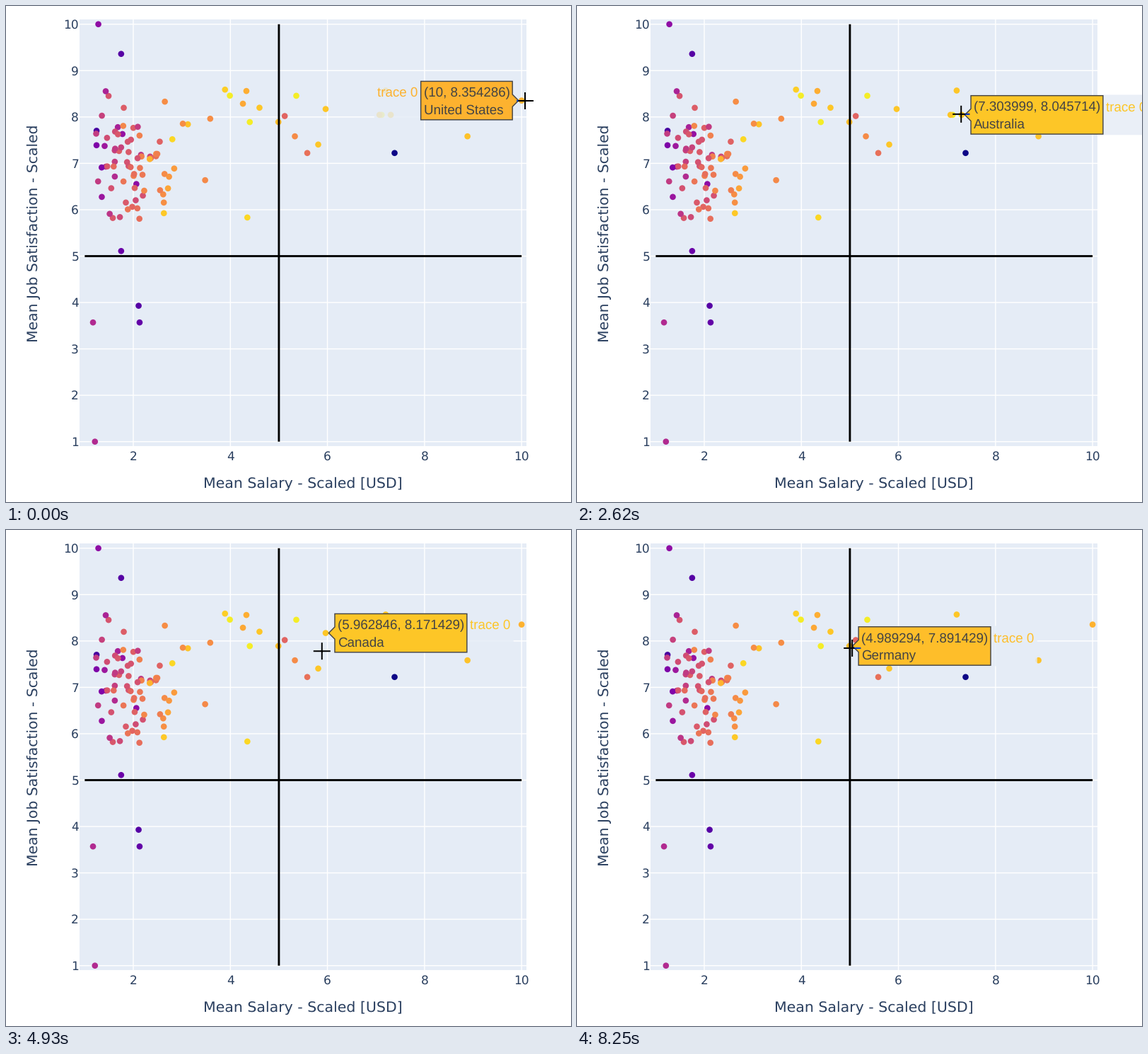
Animation of 799 by 701 pixels, one loop 9.29 s. Source, as a matplotlib script:

```python
import math

import numpy as np
import matplotlib.pyplot as plt
from matplotlib.animation import FuncAnimation
from matplotlib.patches import Polygon, Rectangle

W, H, DPI = 799, 701, 100
LOOP, FRAMES = 9290, 310
STEP = 70            # ms between two pointer jumps
REACH = 29           # hover radius in pixels
ZOOM = 1.44          # page zoom of the chart
INK, PLOT_BG = "#2a3f5f", "#e5ecf6"
plasma = plt.get_cmap("plasma")

plt.rcParams.update({"text.hinting": "none", "path.snap": False})


def px(n):
    return n * 72 / DPI


def sx(v):
    return 180 + (v - 2) * 68.64


def sy(v):
    return 615.7 - (v - 1) * 65.55


fig = plt.figure(figsize=(W / DPI, H / DPI), dpi=DPI, facecolor="white")
ax = fig.add_axes([0, 0, 1, 1])
ax.set(xlim=(0, W), ylim=(H, 0))
ax.axis("off")


def label(x, y, s, size=17, color=INK, font="DejaVu Sans", **kw):
    kw = {"ha": "center", "va": "baseline", **kw}
    return ax.text(x, y, s, fontsize=px(size), color=color, family=font, **kw)


def line(xs, ys, width, color, z):
    return ax.plot(xs, ys, color=color, lw=px(width), zorder=z,
                   solid_capstyle="butt")[0]


# Plot area, grid, centre lines and axis text
ax.add_patch(Rectangle((104, 19), 632, 603, fc=PLOT_BG, ec="none", zorder=0))
for v in range(1, 11):
    line([104, 736], [sy(v)] * 2, ZOOM, "white", 1)
    label(103, sy(v) + 6.2, str(v), ha="right")
    if v % 2 == 0:
        line([sx(v)] * 2, [19, 622], ZOOM, "white", 1)
        label(sx(v), 642, str(v))
line([sx(5)] * 2, [sy(10), sy(1)], 2 * ZOOM, "black", 3)
line([sx(1), sx(10)], [sy(5)] * 2, 2 * ZOOM, "black", 3)
label(420, 681, "Mean Salary - Scaled [USD]", 20.5)
label(45.5, 321, "Mean Job Satisfaction - Scaled", 20.4,
      rotation=90, rotation_mode="anchor")

# Hovered countries: salary, satisfaction, colour score
COUNTRIES = {
    "United States": (10, 8.354286, 0.83),
    "Ireland": (8.885159, 7.582857, 0.87),
    "Bermuda": (7.383412, 7.222857, 0),
    "Australia": (7.303999, 8.045714, 0.88),
    "Denmark": (7.117238, 8.045714, 0.97),
    "United Kingdom": (7.072585, 8.045714, 0.88),
    "Canada": (5.962846, 8.171429, 0.88),
    "New Zealand": (5.810127, 7.405714, 0.88),
    "Japan": (5.584766, 7.222857, 0.64),
    "Israel": (5.329384, 7.582857, 0.72),
    "Norway": (5.358215, 8.457143, 0.97),
    "Paraguay": (5.120127, 8.02, 0.6),
    "Germany": (4.989294, 7.891429, 0.86),
}

# Points standing apart from the cloud
OUTLIERS = [(7.2, 8.57, 0.88), (4.6, 8.2, 0.88), (4.33, 8.56, 0.82),
            (3.99, 8.46, 0.97), (3.89, 8.59, 0.9), (4.4, 7.89, 0.97),
            (1.28, 10, 0.3), (1.75, 9.36, 0.15), (1.75, 5.11, 0.2),
            (2.11, 3.93, 0.15), (2.13, 3.57, 0.18), (1.17, 3.57, 0.4),
            (1.21, 1, 0.4)]


def cloud(n=80):
    """Dense group on the left; higher salaries get warmer colours."""
    rng = np.random.default_rng(7)
    x = np.clip(1.1 + rng.gamma(2.3, 0.5, n), 1, 4.35)
    y = np.clip(rng.normal(6.85 + 0.13 * x, 0.75), 5.5, 8.75)
    score = 0.92 - 0.75 * np.exp(0.85 * (1 - x)) + rng.normal(0, 0.1, n)
    return np.column_stack([x, y, np.clip(score, 0.12, 0.92)])


points = np.vstack([cloud(), OUTLIERS, list(COUNTRIES.values())])
ax.scatter(sx(points[:, 0]), sy(points[:, 1]), s=px(6 * ZOOM) ** 2,
           c=plasma(points[:, 2]), lw=0, zorder=2)


class Tip:
    """Hover label with a pointer, beside its data point."""

    def __init__(self, country, salary, satisfaction, score):
        self.x, self.y = x, y = sx(salary), sy(satisfaction)
        color = plasma(score)
        edge = "#444444" if score > 0.3 else "white"
        pad, half, arrow = 3 * ZOOM, 27.2, 6 * ZOOM

        def text(dy, s, c, **kw):
            return label(0, y + dy, s, 13 * ZOOM, c, "Liberation Sans",
                         zorder=6, **{"ha": "left", **kw})

        value = f"({salary:.7g}, {satisfaction:.7g})"
        rows = [text(-5.4, value, edge), text(18.8, country, edge)]
        width = max(r.get_window_extent().width for r in rows) + 2 * pad - 1
        side = 1 if x + pad + arrow + width < W else -1
        tip = x + side * pad
        near = tip + side * arrow
        far = near + side * width
        for row in rows:
            row.set_x(min(near, far) + pad)
        name = text(-5.4, "trace 0", color, ha="left" if side > 0 else "right")
        name.set_x(far + side * pad)
        self.box = ax.add_patch(Polygon(
            [(tip, y), (near, y - arrow), (near, y - half), (far, y - half),
             (far, y + half), (near, y + half), (near, y + arrow)],
            fc=color, ec=edge, lw=px(ZOOM), joinstyle="miter", zorder=5))
        veil = ax.add_patch(Rectangle((far, y - 28.4), side * 65.8, 56.8,
                                      fc=PLOT_BG, alpha=0.8, ec="none", zorder=4))
        self.parts = [*rows, self.box, name, veil]
        self.inverse = tuple(1 - c for c in color[:3])

    def show(self, on):
        for part in self.parts:
            part.set_visible(on)


tips = {name: Tip(name, *data) for name, data in COUNTRIES.items()}

# Pointer trips: start, end, country, offset from its dot, upward bow
TRIPS = [
    (60, 60, "United States", (0, 1), 0),
    (360, 860, "Ireland", (0, 1), 0),
    (1140, 1650, "Bermuda", (0, 1), 0),
    (2010, 2400, "Australia", (1, -1), 0),
    (2620, 3060, "Denmark", (1, -1), 0),
    (3560, 3790, "United Kingdom", (-1, -1), 0),
    (4150, 4640, "Canada", (0, 0), 13),
    (4780, 5150, "New Zealand", (0, 1), 0),
    (5380, 5610, "Japan", (11, 3), 0),
    (5910, 6290, "Israel", (1, 1), 0),
    (6430, 6920, "Norway", (1, 1), 5),
    (7440, 7600, "Paraguay", (3, 0), 0),
    (7900, 8100, "Germany", (5, 3), 0),
    (8250, 8250, "Germany", (4, 3), 0),
]


def pointer(t):
    x, y = 734, 134
    for start, end, country, (dx, dy), bow in TRIPS:
        if t < start:
            break
        steps = round((end - start) / STEP) + 1
        f = min(1, (int((t - start) / STEP + 0.25) + 1) / steps)
        goal = tips[country]
        x += f * (goal.x + dx - x)
        y += f * (goal.y + dy - y) - bow * math.sin(math.pi * f)
    return x, y


def hovered(t):
    """The label trails the pointer by one jump."""
    x, y = pointer(t - STEP)

    def distance(tip):
        return math.hypot(tip.x - x, tip.y - y)

    nearest = min(tips.values(), key=distance)
    return nearest if distance(nearest) < REACH else None


cross = line([], [], 2, "black", 7)
cross_on_box = line([], [], 2, "black", 8)


def draw(i):
    t = (i + 0.5) * LOOP / FRAMES
    active = hovered(t)
    for tip in tips.values():
        tip.show(tip is active)
    x, y = pointer(t)
    for part in (cross, cross_on_box):
        part.set_data([x - 12, x + 12, np.nan, x, x],
                      [y, y, np.nan, y - 12, y + 12])
    cross_on_box.set_visible(active is not None)
    if active:
        cross_on_box.set_color(active.inverse)
        cross_on_box.set_clip_path(active.box)
    return []


anim = FuncAnimation(fig, draw, frames=FRAMES, interval=LOOP / FRAMES,
                     repeat=True, repeat_delay=0, blit=False)
plt.show()
```
